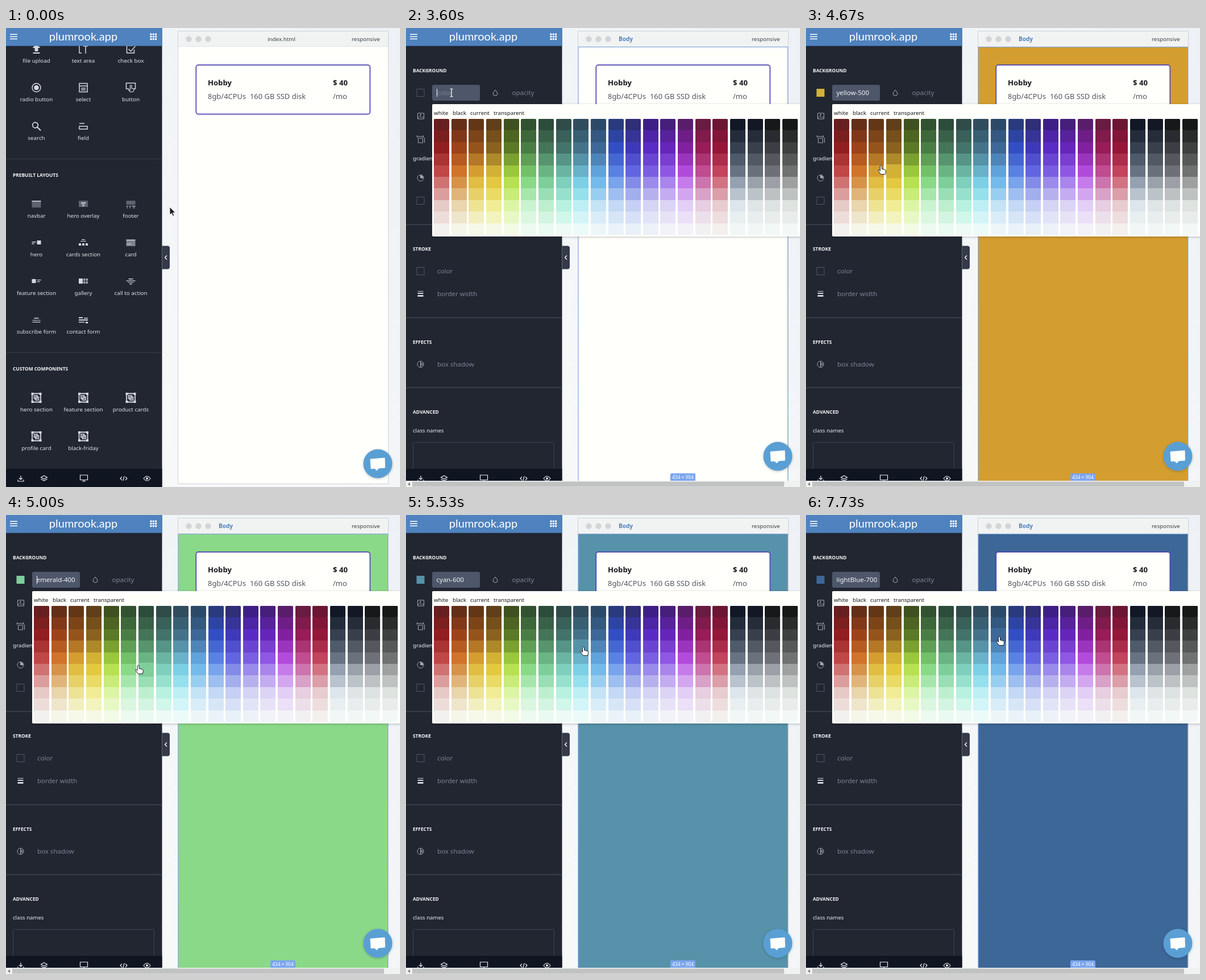
These frames come from a looping animation (693x808 px, 8000 ms). An HTML page:

```html
<!DOCTYPE html>
<html lang="en">
<head>
<meta charset="utf-8">
<title>Page builder</title>
<style>
html, body { margin: 0; width: 100%; height: 100%; overflow: hidden; }
svg { display: block; width: 693px; height: 808px; font-family: "Noto Sans", "Open Sans", sans-serif; }
</style>
</head>
<body>
<svg id="stage" viewBox="0 0 693 808"></svg>
<script>
const LOOP = 8000, STEP = 200 / 3;
const PAPER = '#fffffc', DARK = '#212631', PALE = '#d6d9de', MUTED = '#7b8494';
const SIDE = 274.5;
const stage = document.getElementById('stage');

// ---- drawing helpers
const box = (x, y, w, h, fill, more = '') =>
  `<rect x="${x}" y="${y}" width="${w}" height="${h}" fill="${fill}" ${more}/>`;
const text = (x, y, s, size, fill, more = '') =>
  `<text x="${x}" y="${y + size * 0.37}" font-size="${size}" fill="${fill}" ${more}>${s}</text>`;
const heading = (y, s) => text(12, y + 0.7, s, 8.4, '#f4f5f6', 'font-weight="700"');
const at = (x, y, s) => `<g transform="translate(${x} ${y})">${s}</g>`;
const line = (d, color = PALE, w = 1.5) =>
  `<path d="${d}" fill="none" stroke="${color}" stroke-width="${w}"/>`;
const solid = (d, color = PALE) => `<path d="${d}" fill="${color}"/>`;
const dim = d => solid(d, '#5c636f');
const r = (x, y, w, h) => `M${x} ${y}h${w}v${h}h${-w}z`;

// ---- palette: shades 50, 200, 400, 500, 700, 900; the rest lie halfway
const hues = `red fef2f2 fecaca f87171 ef4444 b91c1c 7f1d1d
orange fff7ed fed7aa fb923c f97316 c2410c 7c2d12
amber fffbeb fde68a fbbf24 f59e0b b45309 78350f
yellow fefce8 fef08a facc15 eab308 a16207 713f12
lime f7fee7 d9f99d a3e635 84cc16 4d7c0f 365314
green f0fdf4 bbf7d0 4ade80 22c55e 15803d 14532d
emerald ecfdf5 a7f3d0 34d399 10b981 047857 064e3b
teal f0fdfa 99f6e4 2dd4bf 14b8a6 0f766e 134e4a
cyan ecfeff a5f3fc 22d3ee 06b6d4 0e7490 164e63
lightBlue f0f9ff bae6fd 38bdf8 0ea5e9 0369a1 0c4a6e
blue eff6ff bfdbfe 60a5fa 3b82f6 1d4ed8 1e3a8a
indigo eef2ff c7d2fe 818cf8 6366f1 4338ca 312e81
violet f5f3ff ddd6fe a78bfa 8b5cf6 6d28d9 4c1d95
purple faf5ff e9d5ff c084fc a855f7 7e22ce 581c87
fuchsia fdf4ff f5d0fe e879f9 d946ef a21caf 701a75
pink fdf2f8 fbcfe8 f472b6 ec4899 be185d 831843
rose fff1f2 fecdd3 fb7185 f43f5e be123c 881337
blueGray f8fafc e2e8f0 94a3b8 64748b 334155 0f172a
coolGray f9fafb e5e7eb 9ca3af 6b7280 374151 111827
gray fafafa e4e4e7 a1a1aa 71717a 3f3f46 18181b
trueGray fafafa e5e5e5 a3a3a3 737373 404040 171717
warmGray fafaf9 e7e5e4 a8a29e 78716c 44403c 1c1917`.split('\n').map(s => s.split(' '));
const shades = [900, 800, 700, 600, 500, 400, 300, 200, 100, 50];
const stops = [6, 5.5, 5, 4.5, 4, 3, 2.5, 2, 1.5, 1];

// muted rendering of sRGB: wider colour space, then a little grey
function mute(rgb) {
  const [R, G, B] = rgb.map(v => Math.pow(v / 255, 2.2));
  const wide = [0.715 * R + 0.285 * G, G, 0.041 * G + 0.959 * B].map(v => 255 * Math.pow(v, 1 / 2.2));
  const luma = 0.3 * wide[0] + 0.59 * wide[1] + 0.11 * wide[2];
  return 'rgb(' + wide.map((v, i) => Math.round((0.91 * v + 0.09 * luma) * [0.97, 0.99, 0.98][i])) + ')';
}
const channels = hex => [0, 2, 4].map(i => parseInt(hex.substr(i, 2), 16));
function shade(col, row) {
  const s = stops[row], a = channels(hues[col][Math.floor(s)]), b = channels(hues[col][Math.ceil(s)]);
  return mute(a.map((v, i) => (v + b[i]) / 2));
}
const PITCH = 30.65, ROW = 20.4;
const cellX = c => Math.round(49 + c * PITCH), cellY = i => Math.round(160 + i * ROW);
function cellAt([x, y]) {
  const col = Math.floor((x - 49) / PITCH), row = Math.floor((y - 160) / ROW);
  return row >= 0 && row < 10 && col >= 0 && col < 22 ? [col, row] : null;
}

// ---- component list
const icons = {
  'file upload': solid('M-3 4v-6h-4l7-7 7 7h-4v6z' + r(-6, 6, 12, 2)),
  'text area': line('M-3 7h-4v-14h4M0 -5h8M4 -5v13'),
  'check box': line('M4 -6h-11v13h13v-6M-4 0l4 4 8-9'),
  'radio button': `<circle r="7.5" fill="none" stroke="${PALE}" stroke-width="1.5"/><circle r="4.3" fill="${PALE}"/>`,
  'select': line(r(-7, -7.5, 14, 15) + 'M-7 -3h14M-4 1h8M-4 4h8'),
  'button': line('M-3 2h-5v-10h16v10h-3') + line('M-1 4v-8h2.500v5l4 1.500v2l-2 3h-4.500l-3-3.500z', PALE, 1.2),
  'search': `<circle cx="-2" cy="-2" r="4.8" fill="none" stroke="${PALE}" stroke-width="1.7"/>` + line('M1.5 1.5l6 6', PALE, 2),
  'field': line('M-7 -5h9' + r(-7, 0, 14, 5)),
  'navbar': dim(r(-8, -6, 16, 12)) + solid(r(-8, -6, 16, 1.5)),
  'hero overlay': dim(r(-8, -6, 16, 11)) + solid(r(-4, -3, 8, 1.5) + r(-3, -.5, 6, 1) + r(-2, 2, 4, 1.5)),
  'footer': dim(r(-8, -6, 16, 7)) + solid('M-8 3h3v1.3h-3zM-3 3h3v1.3h-3zM2 3h6v1.3h-6zM-7 6h2v1h-2zM-2 6h2v1h-2zM4 6h3v1h-3z'),
  'hero': solid(r(1, -4, 7, 7) + r(-8, -2, 7, 1.5) + r(-8, 1, 4, 1.5)),
  'cards section': solid(r(-3, -6, 6, 1.3) + r(-5, -3, 10, 1) + r(-8, 1, 4, 4) + r(-2, 1, 4, 4) + r(4, 1, 4, 4)),
  'card': solid(r(-8, -6, 16, 12), '#7d838d') + solid(r(-8, -5, 16, 1) + r(-7, 2, 8, 1)),
  'feature section': solid(r(-8, -4, 7, 7) + r(1, -3, 7, 1.3) + r(1, 0, 5, 1.3)),
  'gallery': solid(r(-8, -5, 7, 9)) + solid(r(0, -5, 3.5, 4) + r(4.5, -5, 3.5, 4) + r(0, 0, 3.5, 4) + r(4.5, 0, 3.5, 4), '#9a9fa8'),
  'call to action': solid(r(-4, -5, 8, 1.4) + r(-8, -1.5, 16, 1.2) + r(-5, 1.5, 10, 1) + r(-2, 4, 4, 1.4)),
  'subscribe form': solid(r(-4, -4, 8, 1.4) + r(-7, 0, 9, 1) + r(3, 0, 4, 1) + r(-7, 3, 14, 1.3)),
  'contact form': solid(r(-8, -5, 7, 2) + r(1, -4, 7, 1.5) + r(-8, -1, 16, 2) + r(-8, 3, 10, 1.5) + r(4, 3, 4, 3))
};
const group = line(r(-7.5, -7.5, 15, 15), PALE, 1.8) +
  line(r(-4, -4, 5.5, 5.5) + r(-1.5, -1.5, 5.5, 5.5), PALE, 1.6) +
  solid([[-9, -9], [5, -9], [-9, 5], [5, 5]].map(([x, y]) => r(x, y, 4, 4)).join(''));
const grid = (y, names) => names.map((n, i) => {
  const x = [53.5, 136, 219.5][i % 3], cy = y + 68 * Math.floor(i / 3);
  return at(x, cy, (y > 600 ? group : icons[n]) + text(0, 20, n, 9.8, '#dfe2e6', 'text-anchor="middle"'));
}).join('');
const rule = (y, color) => box(0, y, SIDE, 1, color);
const all = Object.keys(icons);
const listPanel = grid(37, all.slice(0, 8)) + rule(230, '#373d49') +
  heading(258, 'PREBUILT LAYOUTS') + grid(310, all.slice(8)) + rule(571, '#373d49') +
  heading(599, 'CUSTOM COMPONENTS') +
  grid(651, ['hero section', 'feature section', 'product cards', 'profile card', 'black-friday']);

// ---- style panel
const GREY = '#a4aab4';
const square = (x, y) => box(x - 6.5, y - 6.5, 13, 13, 'none', 'stroke="#4e5563"');
const prop = (x, y, s, icon, fill = MUTED) =>
  (icon ? at(x, y, icon) : square(x, y)) + text(x + 29.5, y, s, 11.5, fill);
const stylePanel = heading(74, 'BACKGROUND') +
  prop(157, 114, 'opacity', line('M0 -5q-8 9 0 10 8-1 0-10z', GREY, 1)) +
  prop(25.5, 155, 'categor', line(r(-5, -5, 11, 10) + 'M-5 4l4-4 3 3 2-2 2 2', GREY, 1) + `<circle cx="0" cy="-2" r="1.2" fill="${GREY}"/>`, '#4d5564') +
  at(116, 155, line('M4.5 -2.5a5 5 0 1 0 .5 4M5 -6v4h-4', '#f0f1f3', 1.2)) +
  prop(157, 155, 'size', line('M-4 4l8-8M0 -4h4v4M-4 0v4h4', GREY, 1)) +
  prop(25.5, 196, 'position', line(r(-4, -2, 8, 8) + 'M-6 -5h11M7 -3v9M-6 -7v4M5 -7v4', GREY, 1)) +
  prop(157, 196, 'repeat', line('M-5 -4l4 4-4 4M1 -4l4 4-4 4', GREY, 1)) +
  text(12, 229, 'gradient', 9.7, '#eceef0') +
  at(25.5, 264, line('M0 -5.5a5.500 5.500 0 1 0 .01 0M0 -5v5h5', GREY, 1) + solid('M0 0v-5a5 5 0 0 1 5 5z', GREY)) +
  text(54, 264, 'gradient-to-r', 11.4, '#eceef0') +
  prop(157, 264, 'via') + prop(25.5, 304, 'from') + prop(157, 304, 'to') +
  rule(345.5, '#4f5663') + heading(388, 'STROKE') + prop(25.5, 428, 'color') +
  prop(25.5, 468, 'border width', solid(r(-5, -5, 10, 1) + r(-5, -2, 10, 2) + r(-5, 2, 10, 3), '#d0d3d8')) +
  rule(509.5, '#4f5663') + heading(552, 'EFFECTS') +
  prop(25.5, 592, 'box shadow', line('M0 -5.5a5.500 5.500 0 1 0 .01 0M0 -5v10M0 -2h4M0 0h5M0 2h4', GREY, 1)) +
  rule(632.5, '#4f5663') + heading(675, 'ADVANCED') +
  text(12, 708, 'class names', 9.6, '#eceef0') +
  box(12.5, 729.5, 248, 80, 'none', 'rx="2" stroke="#3d4452"') +
  box(267.5, 379, 4.5, 324, '#5b606b', 'id="thumb" rx="2"');

// ---- popup with swatches
let cells = '';
hues.forEach((h, c) => shades.forEach((s, i) => {
  cells += box(cellX(c), cellY(i), 27, cellY(i + 1) - cellY(i), shade(c, i), i === 0 ? 'rx="1.5"' : '');
}));
const popup = box(46, 134, 660, 233, PAPER, 'rx="2" filter="url(#soft)"') +
  [[49, 'white'], [82, 'black'], [113, 'current'], [154, 'transparent']]
    .map(([x, s]) => text(x, 149, s, 9.8, '#14161a')).join('') + cells;

const dots = [0, 1, 2].map(i => [0, 1, 2].map(j => r(253.5 + 4.3 * i, 9.5 + 4.3 * j, 3, 3)).join('')).join('');

stage.innerHTML = `
<defs>
  <linearGradient id="desk" x1="1" y1="0" x2="0" y2="1"><stop offset="0" stop-color="#edf1f5"/><stop offset="1" stop-color="#fafbfa"/></linearGradient>
  <filter id="soft" x="-10%" y="-10%" width="120%" height="120%"><feDropShadow dx="0" dy="1" stdDeviation="2" flood-opacity=".25"/></filter>
</defs>
${box(0, 0, 693, 808, 'url(#desk)')}
${box(302.5, 5.5, 370, 797, PAPER, 'stroke="#cfd2d6"')}
${box(303, 6, 369, 27, '#f1f3f3')}${box(303, 32.5, 369, 1, '#d3d6d9')}
${[321.5, 338.5, 355.5].map(x => `<circle cx="${x}" cy="19.500" r="5.2" fill="#d3d5d8"/>`).join('')}
${text(484.5, 19, 'index.html', 9.8, '#3c4043', 'id="file" text-anchor="middle"')}
${text(374, 19, 'Body', 10, '#4c82c0', 'id="tag" font-weight="700"')}
${text(608, 19, 'responsive', 9.8, '#3c4043')}
${box(303, 33, 369, 769, PAPER, 'id="page"')}
<g id="outline">${box(303, 33.5, 368.5, 768, 'none', 'stroke="#7ba5df"')}
${box(465, 784, 44, 14, '#7ba5ee', 'rx="2"')}${text(487, 791, '434 × 904', 8.4, '#fff', 'text-anchor="middle"')}</g>
${box(334.3, 65.2, 306, 86.5, PAPER, 'rx="4" stroke="#4f46b5" stroke-width="1.7"')}
${text(355, 96, 'Hobby', 13.1, '#16181d', 'font-weight="600"')}
${text(355, 120, '8gb/4CPUs&#160; 160 GB SSD disk', 12.95, '#50565f')}
${text(575, 96, '$ 40', 13.1, '#16181d', 'font-weight="600"')}
${text(575, 120, '/mo', 13.1, '#50565f')}
${box(0, 0, SIDE, 808, DARK)}
<path d="M${SIDE} 383.500h9.500q4 0 4 4v33q0 4-4 4h-9.500z" fill="#343a4a"/>${line('M283 400.500l-3.500 3.500 3.500 3.500', '#fff', 1.3)}
<g id="list">${listPanel}</g>
<g id="styles">${box(46, 100, 84, 28, '#4e566a', 'id="field" rx="3"')}${stylePanel}
${box(19, 107.5, 13, 13, 'none', 'id="swatch" stroke="#4e5563"')}
${text(55, 114, 'color', 11.5, MUTED, 'id="name"')}
${box(54, 107, 1, 14, '#fff', 'id="caret"')}</g>
${box(0, 0, SIDE, 31.6, '#4f82be')}
${solid(r(7, 10.5, 13, 1.5) + r(7, 14.5, 13, 1.5) + r(7, 18.5, 13, 1.5) + dots, '#fff')}
<text x="136" y="22" font-size="20" font-family="Lato, sans-serif" text-anchor="middle" fill="#fff">plumrook.app</text>
${box(0, 776, SIDE, 32, '#101522')}
${at(26, 793, line('M0 -5v7M-3 -1l3 3 3-3M-5 2v3h10v-3', '#e6e8ec', 1.2))}
${at(67, 793, line('M0 -5l5.500 3-5.500 3-5.500-3zM-5.500 1l5.500 3 5.500-3', '#e6e8ec', 1.2))}
${at(137, 792, line(r(-6.5, -5, 13, 8.5) + 'M0 3v3M-3 6h6', '#e6e8ec', 1.2))}
${at(207, 793, line('M-3 -3l-3 3 3 3M3 -3l3 3-3 3M1.200 -4l-2.400 8', '#e6e8ec', 1.2))}
${at(248, 793, line('M-6 0q6-8 12 0-6 8-12 0z', '#e6e8ec', 1.2) + '<circle r="2" fill="#e6e8ec"/>')}
<g id="popup">${popup}${box(0, 0, 27, ROW + 4, 'none', 'id="hot" rx="1"')}
${box(0, 797, 693, 11, '#f0f1f1')}${box(11, 798.5, 654, 9, '#c1c3c3')}${solid('M3 803l4-3v6z', '#777')}</g>
<g id="chat"><circle r="25.500" fill="#5a9fd4" filter="url(#soft)"/><path d="M-12.500 -8.500l24-2q1 0 1 1l.5 16q0 1-1 1l-10 .8-4 4-3.500-3.500-6 .5q-1 0-1-1l-1-15.500q0-1 1-1.300z" fill="${PAPER}"/></g>
<g id="cursor">
  <path d="M0 0v14l3.200-3 2.300 5 2.200-1-2.200-4.800h4.300z" fill="#1c1d20" stroke="#fff" stroke-width=".8"/>
  <path d="M-2.500 -7q2.500 0 2.500 1.500v11q0 1.500-2.500 1.500M2.500 -7q-2.500 0-2.500 1.500v11q0 1.500 2.500 1.500" fill="none" stroke="#fff" stroke-width="1.2"/>
  <path d="M-1.500 1q1.500-2 3 0v5l5.500 1.500q2 .6 1.700 2.500l-1 5.500h-8l-4.500-6q-.5-2 1.500-1.500l1.800 1.500z" fill="#fff" stroke="#1c1d20" stroke-width="1"/>
</g>`;

// ---- pointer path: time, x, y
const path = [[0, 288, 315], [733, 288, 315], [933, 323, 320], [2133, 323, 320], [2200, 324, 320],
  [2600, 190, 220], [3000, 76, 132], [3133, 80, 114], [4067, 80, 114], [4133, 80, 132], [4200, 79, 160],
  [4333, 78, 188], [4400, 76, 200], [4600, 112, 232], [4667, 132, 242], [4733, 156, 248], [4933, 215, 264],
  [5267, 303, 265], [5333, 308, 264], [5533, 312, 232], [5600, 312, 230], [6267, 312, 230],
  [6600, 332, 345], [6867, 332, 345], [7133, 342, 347], [7267, 342, 347], [7533, 340, 214], [9000, 340, 214]];
function pointer(t) {
  const i = Math.max(1, path.findIndex(p => p[0] > t)), [a, b] = [path[i - 1], path[i]];
  const k = (t - a[0]) / (b[0] - a[0]);
  return [a[1] + (b[1] - a[1]) * k, a[2] + (b[2] - a[2]) * k];
}

const el = {};
stage.querySelectorAll('[id]').forEach(n => { el[n.id] = n; });
const set = (n, attrs) => { for (const k in attrs) n.setAttribute(k, attrs[k]); };
const show = (n, on) => n.setAttribute('display', on ? 'inline' : 'none');
const rows = [114, 155, 196, 264, 304];

function draw(time) {
  const t = Math.floor((time + 5) / STEP) * STEP;
  const pos = pointer(t), [x, y] = pos;
  const styled = t >= 1660, open = t >= 3595;
  // the hovered swatch leads the drawn pointer by one step
  const hover = open ? cellAt(pointer(t + STEP)) : null;
  const paint = open ? cellAt(pos) : null;

  show(el.list, !styled);
  show(el.styles, styled);
  show(el.file, !styled);
  show(el.tag, styled);
  show(el.outline, t >= 795);
  show(el.popup, open);
  show(el.thumb, !open);
  set(el.chat, { transform: `translate(654 ${open ? 754 : 767})` });
  set(el.page, { fill: paint ? shade(...paint) : PAPER });

  const over = open ? 114 : rows.find(v => Math.abs(v - y) <= 14 && x >= 46 && x <= 130);
  show(el.field, over);
  if (over) set(el.field, { y: over - 14 });

  el.name.textContent = hover ? hues[hover[0]][0] + '-' + shades[hover[1]] : 'color';
  set(el.name, { x: hover ? 53.5 : 55, fill: hover ? '#f4f5f7' : MUTED });
  const tint = hover ? shade(...hover) : 'none';
  set(el.swatch, { fill: tint, stroke: hover ? tint : '#4e5563' });
  set(el.hot, { fill: tint });
  if (hover) set(el.hot, { x: cellX(hover[0]), y: cellY(hover[1]) - 2 });
  show(el.caret, open && (t < 4130 || t >= 4995 && Math.floor((t + 5) / 500) % 2 === 0));

  const kind = open && y > 134 ? 2 : styled && over && x < 131 ? 1 : 0;
  [...el.cursor.children].forEach((n, i) => show(n, i === kind));
  set(el.cursor, { transform: `translate(${x.toFixed(1)} ${y.toFixed(1)})` });
}

const start = performance.now();
function tick() {
  draw((performance.now() - start) % LOOP);
  requestAnimationFrame(tick);
}
draw(0);
tick();
</script>
</body>
</html>
```
